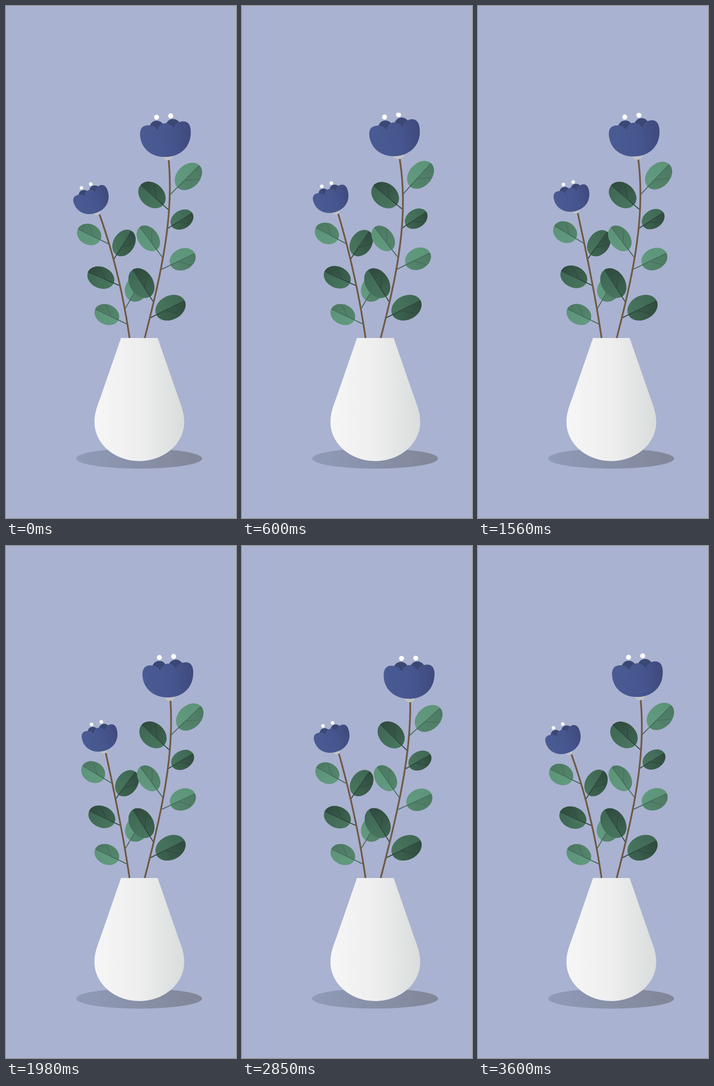
An HTML page for the animation above (3.63 s loop, 502x1115 px).

```html
<!DOCTYPE html>
<html lang="en">
<head>
<meta charset="utf-8">
<title>Flowers in a vase</title>
<style>
  html, body { margin: 0; width: 100%; height: 100%; overflow: hidden; background: #a9b2d0; }
  svg { display: block; width: 100%; height: 100%; }
</style>
</head>
<body>
<svg id="stage" viewBox="0 0 502 1115">
  <defs>
    <linearGradient id="vase"><stop offset="0" stop-color="#f6f6f6"/><stop offset=".5" stop-color="#eeeeef"/><stop offset="1" stop-color="#d9dddc"/></linearGradient>
    <linearGradient id="shadow"><stop offset="0" stop-color="#909bb8"/><stop offset="1" stop-color="#818698"/></linearGradient>
    <linearGradient id="petal"><stop offset="0" stop-color="#4a5b94"/><stop offset=".6" stop-color="#46558e"/><stop offset="1" stop-color="#3f4a7d"/></linearGradient>
    <linearGradient id="lightA"><stop offset="0" stop-color="#629a80"/><stop offset="1" stop-color="#5c9478"/></linearGradient>
    <linearGradient id="lightB"><stop offset="0" stop-color="#55866d"/><stop offset="1" stop-color="#4c7862"/></linearGradient>
    <linearGradient id="darkA"><stop offset="0" stop-color="#49765f"/><stop offset="1" stop-color="#3e6753"/></linearGradient>
    <linearGradient id="darkB"><stop offset="0" stop-color="#3e6451"/><stop offset="1" stop-color="#2f4a3e"/></linearGradient>
    <clipPath id="crop"><rect y="232.5" width="502" height="883"/></clipPath>
  </defs>
  <rect width="502" height="1115" fill="#a9b2d0"/>
  <ellipse cx="290.5" cy="985.5" rx="137.5" ry="22" fill="url(#shadow)"/>
  <g id="plants" clip-path="url(#crop)"></g>
  <path fill="url(#vase)" d="M251 723H331L374 847C381 867 389 884 389 906C389 953 345 991 291 991C237 991 193 953 193 906C193 884 201 867 208 847Z"/>
</svg>
<script>
const LOOP = 3630, CYCLE = 3600, BASE = 723;
const plants = document.getElementById('plants');

// Leaf: attach x, y, centre x, y, radii, tone
const stems = [
  {
    curve: [[270, 726], [257, 633], [235, 540], [204, 454]],
    head: { x: 199.7, y: 450.6, tilt: -21.3, scale: .71 },
    reach: 14.5, power: 2.6, lift: -.22, sag: 0,
    sway: a => .7 * Math.sin(a / 2) + .15 * (1 - Math.cos(a)),
    leaves: [
      [260, 659, 285.5, 615, 30, 25, 'light'],
      [265, 693, 220, 672, 28, 21.7, 'light'],
      [248, 609, 207, 591.5, 30.5, 23.2, 'dark'],
      [235, 552, 257.5, 516, 31, 23, 'dark'],
      [224, 518, 181.5, 497.5, 27.3, 22.5, 'light']
    ]
  },
  {
    curve: [[302, 726], [336, 593], [367, 465], [355, 335]],
    head: { x: 353.7, y: 330, tilt: -4.6, scale: 1 },
    reach: 13, power: 2.5, lift: .27, sag: .005,
    sway: a => -Math.sin(a),
    leaves: [
      [315, 679, 359, 657, 34.5, 26.1, 'dark'],
      [322, 645, 295.5, 603.5, 35, 25.4, 'dark'],
      [338.5, 574, 385.5, 551.5, 29.5, 23.2, 'light'],
      [342, 548, 310.5, 506, 31, 21.9, 'light'],
      [352, 485, 384, 465, 26.7, 19.9, 'dark'],
      [355, 444, 318.5, 411.5, 33, 25.5, 'dark'],
      [358, 411, 398, 371, 34, 25, 'light']
    ]
  }
];

const BOWL = 'M-57-52C-57-68-50-73.5-40-73.5C-29-73.5-22-69-18-61C-15-70-8-75-1-75' +
  'C7-75 14-70 17-62C20-71 28-76 38-76C48-76 54-69 54-56C54-22 30-1.5-1-1.5C-34-1.5-57-23-57-52Z';

function add(parent, tag, attrs = {}) {
  const el = document.createElementNS('http://www.w3.org/2000/svg', tag);
  for (const k in attrs) el.setAttribute(k, attrs[k]);
  parent.appendChild(el);
  return el;
}

function makeLeaf(parent, [ax, ay, cx, cy, rx, ry, tone]) {
  const el = add(parent, 'g');
  const angle = Math.atan2(cy - ay, cx - ax) * 180 / Math.PI;
  const stalk = Math.hypot(cx - ax, cy - ay);
  const blade = add(el, 'g', { transform: `translate(${cx} ${cy}) rotate(${angle})` });
  const vein = tone === 'dark' ? '#2d483c' : '#446b5a';
  add(blade, 'ellipse', { rx, ry, fill: `url(#${tone}A)` });
  add(blade, 'path', { d: `M${-rx} 0A${rx} ${ry} 0 0 0 ${rx} 0Z`, fill: `url(#${tone}B)` });
  add(blade, 'path', { d: `M${-stalk} 0H${-rx * .4}`, stroke: vein, 'stroke-width': 2 });
  add(blade, 'path', { d: `M${-rx * .4} 0H${rx * .97}`, stroke: vein, 'stroke-width': 1.6 });
  add(blade, 'path', { d: `M${-rx * .38} 0L${rx * .33} ${ry * .8}`, stroke: vein, 'stroke-width': 1.3 });
  return { el, x: ax, y: ay };
}

function makeFlower(parent, { x, y, tilt, scale }) {
  const el = add(parent, 'g');
  const g = add(el, 'g', { transform: `translate(${x} ${y}) rotate(${tilt}) scale(${scale})` });
  add(g, 'ellipse', { cy: -1, rx: 10.5, ry: 7, fill: '#c3c3c5' });
  add(g, 'circle', { cx: -19.5, cy: -66, r: 16, fill: '#3b4874' });
  add(g, 'circle', { cx: 16.5, cy: -67, r: 16, fill: '#3b4874' });
  add(g, 'path', { d: BOWL, fill: 'url(#petal)' });
  add(g, 'circle', { cx: -18, cy: -89.5, r: 5.5, fill: '#fff' });
  add(g, 'circle', { cx: 13, cy: -90, r: 5.5, fill: '#fff' });
  return { el, x, y };
}

for (const stem of stems) {
  const g = add(plants, 'g');
  stem.parts = stem.leaves.map(leaf => makeLeaf(g, leaf));
  stem.line = add(g, 'path', { fill: 'none', stroke: '#705a45', 'stroke-width': 3.8 });
  stem.parts.push(makeFlower(g, stem.head));
}

function bezier([a, b, c, d], t) {
  const s = 1 - t;
  return [0, 1].map(i => s * s * s * a[i] + 3 * s * s * t * b[i] + 3 * s * t * t * c[i] + t * t * t * d[i]);
}

// Shift and turn of the stem at height y for a given sway
function bend(stem, y, sway) {
  const length = BASE - stem.head.y;
  const h = Math.max(0, (BASE - y) / length);
  const push = stem.reach * sway;
  const dx = push * h ** stem.power;
  return {
    dx,
    dy: stem.lift * dx + stem.sag * dx * dx,
    turn: push * stem.power / length * h ** (stem.power - 1) * 180 / Math.PI
  };
}

function draw(ms) {
  const phase = Math.min(ms % LOOP, CYCLE) / CYCLE * 2 * Math.PI;
  for (const stem of stems) {
    const sway = stem.sway(phase);
    const points = [];
    for (let i = 0; i <= 40; i++) {
      const [x, y] = bezier(stem.curve, i / 40);
      const b = bend(stem, y, sway);
      points.push(`${(x + b.dx).toFixed(2)} ${(y + b.dy).toFixed(2)}`);
    }
    stem.line.setAttribute('d', 'M' + points.join('L'));
    for (const { el, x, y } of stem.parts) {
      const b = bend(stem, y, sway);
      el.setAttribute('transform', `translate(${b.dx} ${b.dy}) rotate(${b.turn} ${x} ${y})`);
    }
  }
}

let start;
function tick(now) {
  start ??= now;
  draw(now - start);
  requestAnimationFrame(tick);
}
draw(0);
requestAnimationFrame(tick);
</script>
</body>
</html>
```
